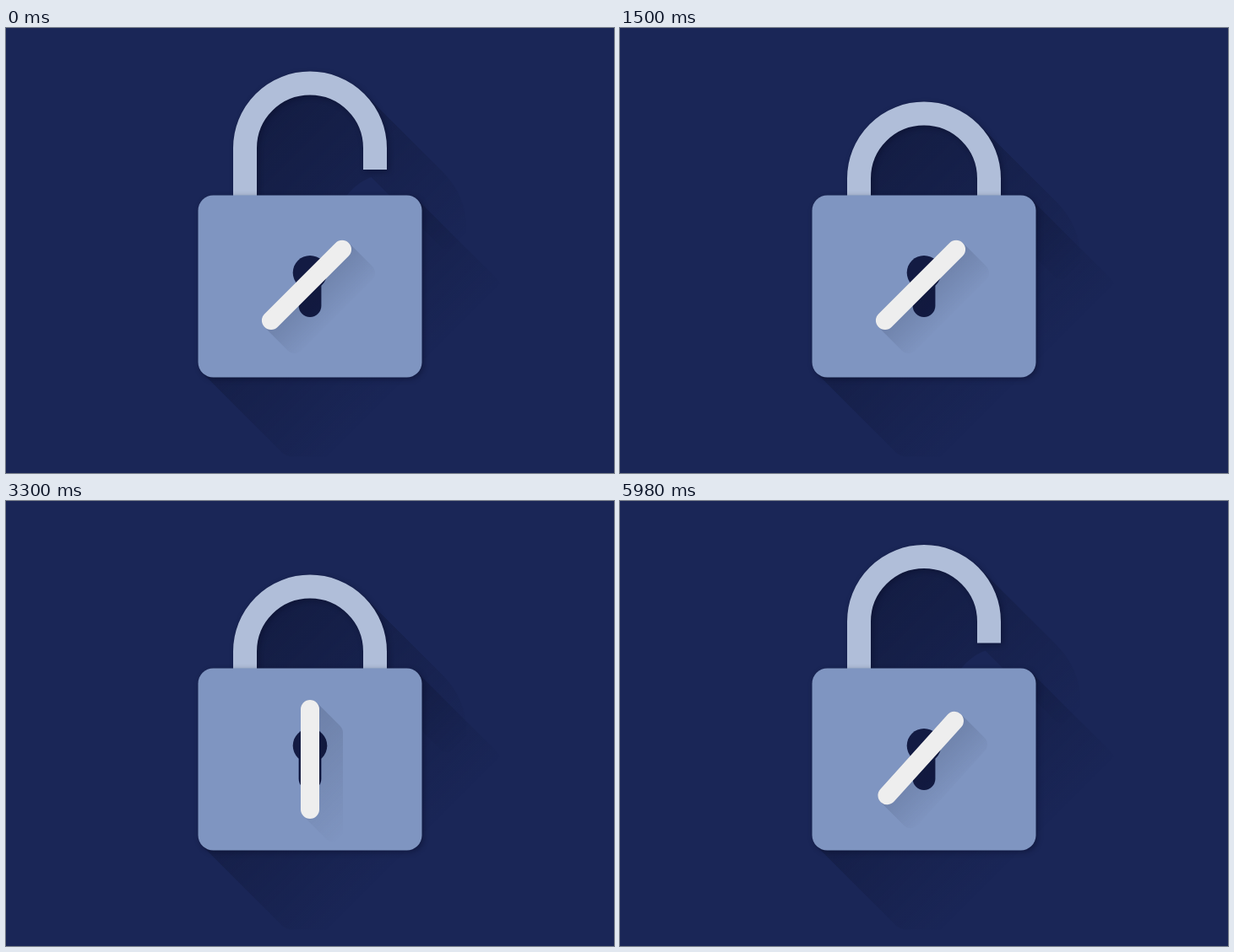
An HTML page with a canvas for the animation above (6000 ms loop, 720 px wide and 528 px high).

```html
<!DOCTYPE html>
<html lang="en">
<head>
<meta charset="utf-8">
<title>Padlock</title>
<style>
html, body { margin: 0; width: 100%; height: 100%; overflow: hidden; background: #1a2657; }
canvas { display: block; }
</style>
</head>
<body>
<canvas id="stage" width="720" height="528"></canvas>
<script>
const W = 720, H = 528, LOOP = 6000, TICK = 20, MOVE = 300;
const ctx = document.getElementById('stage').getContext('2d');
const layer = document.createElement('canvas');
layer.width = W;
layer.height = H;
const lay = layer.getContext('2d');

const clamp = v => Math.max(0, Math.min(1, v));
const ramp = (t, start) => clamp((t - start) / MOVE);
const smooth = p => p * p * (3 - 2 * p);

function shackle(c, y) {
  c.lineWidth = 28;
  c.lineCap = 'butt';
  c.beginPath();
  c.moveTo(283, 215);
  c.lineTo(283, y);
  c.arc(360, y, 77, Math.PI, 0);
  c.lineTo(437, y + 25.5);
  c.stroke();
}

function body(c) {
  c.beginPath();
  c.roundRect(227.5, 198.5, 265, 216, 18);
  c.fill();
}

function bar(c, angle) {
  c.save();
  c.translate(360, 300.8);
  c.rotate(angle);
  c.beginPath();
  c.roundRect(-11, -64.8, 22, 141, 11);
  c.fill();
  c.restore();
}

// Sweeps a shape down the diagonal and fades it along x + y.
function longShadow(draw, length, from, to, alpha) {
  lay.globalCompositeOperation = 'source-over';
  lay.clearRect(0, 0, W, H);
  lay.fillStyle = lay.strokeStyle = '#000';
  for (let i = 0; i <= length; i++) {
    lay.save();
    lay.translate(i, i);
    draw(lay);
    lay.restore();
  }
  const fade = lay.createLinearGradient(from / 2, from / 2, to / 2, to / 2);
  fade.addColorStop(0, `rgba(8,12,30,${alpha})`);
  fade.addColorStop(1, 'rgba(8,12,30,0)');
  lay.globalCompositeOperation = 'source-in';
  lay.fillStyle = fade;
  lay.fillRect(0, 0, W, H);
  ctx.drawImage(layer, 0, 0);
}

function raised(draw) {
  ctx.save();
  ctx.shadowColor = 'rgba(5,8,30,0.4)';
  ctx.shadowBlur = 6;
  ctx.shadowOffsetX = ctx.shadowOffsetY = 2;
  draw(ctx);
  ctx.restore();
}

function keyhole() {
  ctx.fillStyle = '#131b43';
  ctx.beginPath();
  ctx.arc(360, 290.3, 20.3, 0, Math.PI * 2);
  ctx.fill();
  ctx.beginPath();
  ctx.roundRect(346.6, 290, 26.8, 53, [0, 0, 13.4, 13.4]);
  ctx.fill();
}

function render(t) {
  const shut = smooth(ramp(t, 1200)) - smooth(ramp(t, 5700));
  const turn = 1 - ramp(t, 3000) + ramp(t, 5700);
  const drop = 36 * shut;
  const angle = turn * Math.PI / 4;
  const arch = c => shackle(c, 142.6 + drop);
  const key = c => bar(c, angle);

  ctx.fillStyle = '#1a2657';
  ctx.fillRect(0, 0, W, H);
  longShadow(arch, 94, 430 + drop, 790 + drop, 0.32);
  longShadow(body, 94, 640, 890, 0.26);

  ctx.strokeStyle = '#b0bed9';
  raised(arch);
  ctx.fillStyle = '#7f95c1';
  raised(body);
  keyhole();

  const reach = 60 * Math.abs(Math.cos(angle) - Math.sin(angle)) + 15;
  longShadow(key, 28, 665 - reach, 721 + reach, 0.17);
  ctx.fillStyle = '#eeeeee';
  key(ctx);
}

const begin = performance.now();
let last = -1;
function frame() {
  const t = Math.floor((performance.now() - begin) % LOOP / TICK) * TICK;
  if (t !== last) render(last = t);
  requestAnimationFrame(frame);
}
frame();
</script>
</body>
</html>
```
